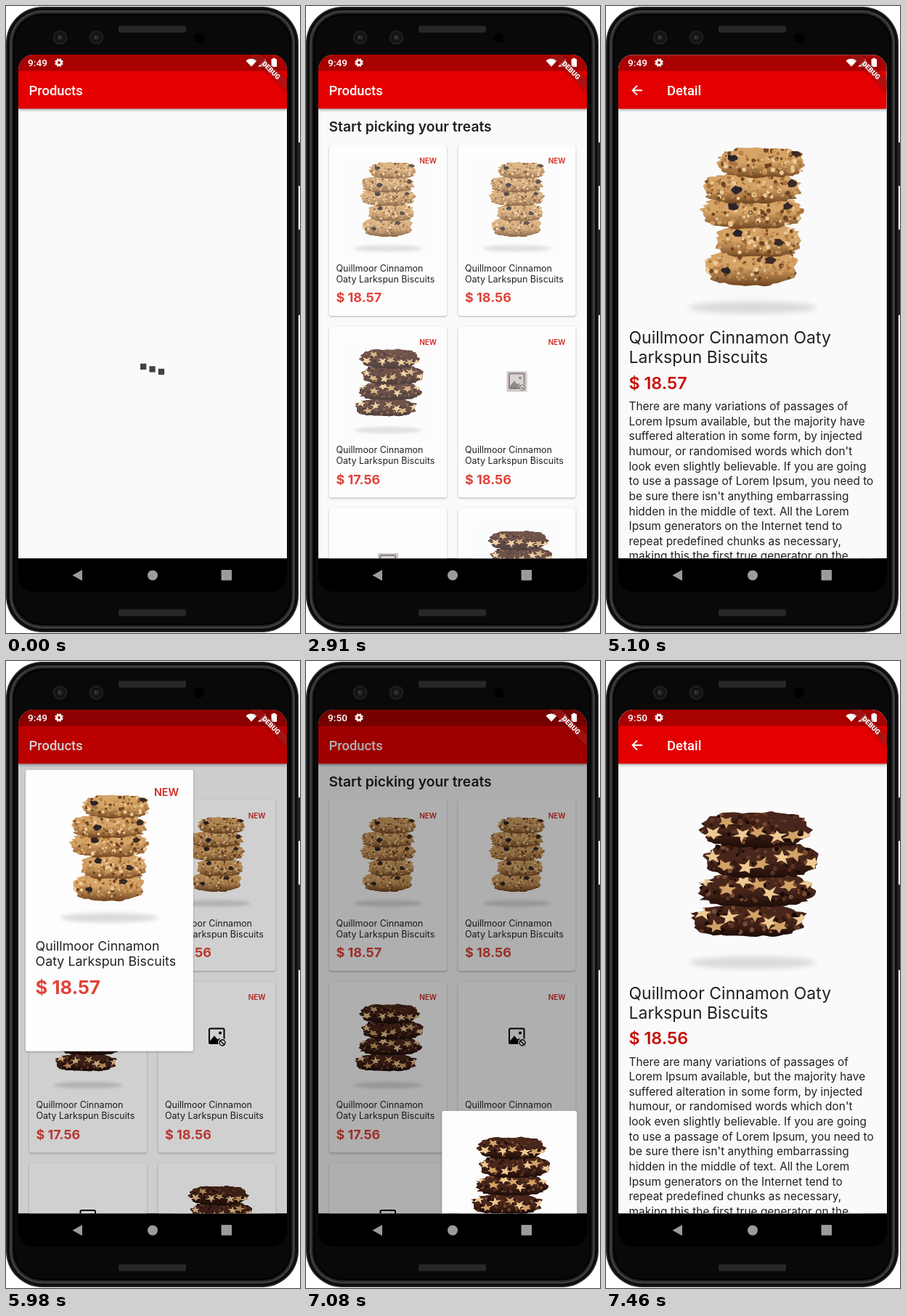
Animation of 405x864 px, one loop 8000 ms. Source, as an HTML page with a canvas:

```html
<!DOCTYPE html>
<html lang="en">
<head>
<meta charset="utf-8">
<title>Products</title>
<style>
  html, body { margin: 0; width: 100%; height: 100%; overflow: hidden; background: #fff; }
  canvas { display: block; }
</style>
</head>
<body>
<canvas id="stage" width="405" height="864"></canvas>
<script>
const LOOP = 8000;
const RED = '#e40000', PAPER = '#fafafa', CARD = '#fdfdfd', INK = '#242021';
const SCREEN = { x: 17, y: 67, w: 370, h: 694.5 };
const NAME = ['Quillmoor Cinnamon', 'Oaty Larkspun Biscuits'];
const LONG_NAME = ['Quillmoor Cinnamon Oaty', 'Larkspun Biscuits'];
const BODY = [
  'There are many variations of passages of',
  'Lorem Ipsum available, but the majority have',
  'suffered alteration in some form, by injected',
  "humour, or randomised words which don't",
  'look even slightly believable. If you are going',
  'to use a passage of Lorem Ipsum, you need to',
  "be sure there isn't anything embarrassing",
  'hidden in the middle of text. All the Lorem',
  'Ipsum generators on the Internet tend to',
  'repeat predefined chunks as necessary,',
  'making this the first true generator on the'
];

let ctx = document.getElementById('stage').getContext('2d');

const clamp = v => Math.max(0, Math.min(1, v));
const mix = (a, b, k) => a + (b - a) * k;
const inter = (size, weight = 400) => `${weight} ${size}px Inter, sans-serif`;
const roboto = (size, weight = 500) => `${weight} ${size}px Roboto, sans-serif`;

// Cubic bezier (0.4, 0, 0.2, 1)
function fastOutSlowIn(u) {
  let lo = 0, hi = 1;
  for (let i = 0; i < 24; i++) {
    const s = (lo + hi) / 2, r = 1 - s;
    if (1.2 * r * r * s + 0.6 * r * s * s + s ** 3 < u) lo = s; else hi = s;
  }
  return lo * lo * (3 - 2 * lo);
}

function randomizer(seed) {
  return () => (seed = (seed * 16807) % 2147483647) / 2147483647;
}

function text(str, x, y, font, color, align = 'left') {
  ctx.font = font;
  ctx.fillStyle = color;
  ctx.textAlign = align;
  ctx.fillText(str, x, y);
}

function rect(x, y, w, h, color) {
  ctx.fillStyle = color;
  ctx.fillRect(x, y, w, h);
}

function rounded(x, y, w, h, r, color) {
  ctx.beginPath();
  ctx.roundRect(x, y, w, h, r);
  if (color) { ctx.fillStyle = color; ctx.fill(); }
}

function circle(x, y, r, color) {
  ctx.beginPath();
  ctx.arc(x, y, r, 0, 7);
  ctx.fillStyle = color;
  ctx.fill();
}

function polygon(points, color) {
  ctx.beginPath();
  points.forEach(([x, y]) => ctx.lineTo(x, y));
  ctx.closePath();
  ctx.fillStyle = color;
  ctx.fill();
}

function line(points, width, color) {
  ctx.beginPath();
  points.forEach(([x, y]) => ctx.lineTo(x, y));
  ctx.lineWidth = width;
  ctx.strokeStyle = color;
  ctx.stroke();
}

// Runs draw with its own canvas state
function scoped(draw) {
  ctx.save();
  draw();
  ctx.restore();
}

function shadow(color, blur, dy) {
  ctx.shadowColor = color;
  ctx.shadowBlur = blur;
  ctx.shadowOffsetY = dy;
}

// ---- Cookie stacks, painted once around the picture centre ----
const OAT = {
  seed: 71, top: '#d6a467', bottom: '#6e431f',
  specks: ['#ecca97', '#a8733d', '#6f4523', '#cf9b5c', '#b9834a'], speckCount: 150, speckSize: 1.5,
  chunks: ['#2a2329', '#3a2a26'], chunkCount: 2, chunkSize: 3.4, spikes: 0.3,
  layers: [[-27, -52, 40, -29], [-38, -33, 37, -10], [-39, -16, 38, 9], [-28, 5, 37, 30], [-36, 23, 34, 51]]
};
const DARK = {
  seed: 23, top: '#48261b', bottom: '#1c0c08',
  specks: ['#5e3423', '#170907', '#33180f', '#7a4a30'], speckCount: 110, speckSize: 1.5,
  chunks: ['#efc993', '#d3a266'], chunkCount: 7, chunkSize: 5.6, spikes: 0.8,
  layers: [[-39, -45, 44, -18], [-37, -23, 49, 5], [-42, 1, 46, 26], [-47, 24, 41, 48]]
};
const PIC = { x: -60, y: -58, w: 120, h: 142, density: 3 };

function paintStack(kind) {
  const canvas = document.createElement('canvas');
  canvas.width = PIC.w * PIC.density;
  canvas.height = PIC.h * PIC.density;
  const outer = ctx, rand = randomizer(kind.seed);
  ctx = canvas.getContext('2d');
  ctx.scale(PIC.density, PIC.density);
  ctx.translate(-PIC.x, -PIC.y);
  scoped(() => {
    ctx.filter = 'blur(6px)';
    ctx.beginPath();
    ctx.ellipse(0, 67, 47, 4.5, 0, 0, 7);
    ctx.fillStyle = '#dcdad8';
    ctx.fill();
  });
  for (const [x0, y0, x1, y1] of [...kind.layers].reverse()) {
    const cx = (x0 + x1) / 2, cy = (y0 + y1) / 2, rx = (x1 - x0) / 2, ry = (y1 - y0) / 2;
    const squash = v => Math.sign(v) * Math.abs(v) ** 0.75;
    const outline = Array.from({ length: 54 }, (_, i) => {
      const a = i / 54 * 2 * Math.PI, k = 0.9 + rand() * 0.13;
      return [cx + rx * k * squash(Math.cos(a)), cy + ry * k * squash(Math.sin(a))];
    });
    const tone = ctx.createLinearGradient(0, y0, 0, y1);
    tone.addColorStop(0, kind.top);
    tone.addColorStop(0.5, kind.top);
    tone.addColorStop(1, kind.bottom);
    scoped(() => {
      polygon(outline, tone);
      ctx.clip();
      for (let i = 0; i < kind.speckCount; i++) {
        circle(mix(x0, x1, rand()), mix(y0, y1, rand() * 0.85), kind.speckSize * (0.3 + rand()),
          kind.specks[i % kind.specks.length]);
      }
      for (let i = 0; i < kind.chunkCount; i++) {
        const x = mix(x0, x1, (i + 0.25 + rand() * 0.6) / kind.chunkCount);
        const y = mix(y0, y1, 0.2 + rand() * 0.5);
        const spin = rand() * 6;
        polygon(Array.from({ length: 10 }, (_, j) => {
          const a = spin + j / 10 * 2 * Math.PI;
          const r = kind.chunkSize * (1 - (j % 2) * kind.spikes * 0.7) * (0.75 + rand() * 0.5);
          return [x + Math.cos(a) * r * 1.25, y + Math.sin(a) * r * 0.9];
        }), kind.chunks[i % 2]);
      }
    });
  }
  ctx = outer;
  return canvas;
}

const oatStack = paintStack(OAT), darkStack = paintStack(DARK);

function drawPicture(picture) {
  ctx.drawImage(picture, PIC.x, PIC.y, PIC.w, PIC.h);
}

// ---- Product cards ----
const CARD_W = 162, CARD_H = 236;
const cards = [
  ['$ 18.57', oatStack], ['$ 18.56', oatStack],
  ['$ 17.56', darkStack], ['$ 18.56', null],
  ['$ 18.56', null], ['$ 18.56', darkStack]
].map(([price, picture], i) => ({
  price, picture, isNew: i < 4,
  x: i % 2 ? 209.5 : 32,
  y: 191 + Math.floor(i / 2) * 250.5
}));

function drawPlaceholder(t) {
  const top = Math.max(-11, 7 - (t - 1990) / 45);
  rect(-11, top, 22, 11 - top, '#8f7a77');
  ctx.strokeStyle = '#6f514c';
  ctx.lineWidth = 3;
  ctx.strokeRect(-12.5, -12.5, 25, 25);
}

function drawMissingPicture() {
  rounded(-10.5, -11, 20.5, 20.5, 1.5);
  ctx.lineWidth = 2;
  ctx.strokeStyle = '#000';
  ctx.stroke();
  polygon([[-9.5, 9], [-9.5, 6], [-3.5, -1], [1, 4], [4, 2], [4, 9]], '#000');
  circle(4.5, -5, 2, '#000');
  circle(7.5, 8.5, 6, CARD);
  ctx.beginPath();
  ctx.arc(7.5, 8.5, 4, 0, 7);
  ctx.lineWidth = 1.4;
  ctx.stroke();
  line([[4.7, 5.7], [10.3, 11.3]], 1.4, '#000');
}

function drawCardContent(card, t) {
  scoped(() => {
    ctx.translate(card.x + 81, card.y + 76);
    const alpha = card.picture ? clamp((t - 2350) / 710) : clamp((t - 2600) / 870);
    const left = card.picture ? 1 - alpha : (1 - clamp((t - 2480) / 990)) ** 2;
    if (left > 0) scoped(() => { ctx.globalAlpha *= left; drawPlaceholder(t); });
    if (alpha > 0) scoped(() => {
      ctx.globalAlpha *= alpha;
      if (card.picture) {
        rect(PIC.x, PIC.y, PIC.w, PIC.h, CARD);
        drawPicture(card.picture);
      } else {
        drawMissingPicture();
      }
    });
  });
  if (card.isNew) text('NEW', card.x + 148, card.y + 25.5, inter(10, 600), '#d02a26', 'right');
  NAME.forEach((row, i) => text(row, card.x + 9.5, card.y + 174.5 + i * 15.3, inter(12.5), INK));
  text(card.price, card.x + 9.5, card.y + 217, inter(18, 700), '#e0433a');
}

// ---- Pages ----
function drawAppBar() {
  scoped(() => {
    shadow('rgba(0,0,0,.4)', 4, 1);
    rect(SCREEN.x, SCREEN.y, SCREEN.w, 74.5, RED);
  });
}

function drawLoader(t) {
  const clock = t < 1480 ? Math.min(Math.max(t, 100), 1250) : Math.min(t, 1580) - 230;
  for (let i = 0; i < 3; i++) {
    const y = 500.5 + 5.5 * Math.sin((i - 1) * 0.7 - (clock - 100) / 1000 * 2 * Math.PI);
    rect(185 + i * 12.4, y - 4.2, 8.3, 8.3, '#424242');
  }
}

function drawProducts(t) {
  rect(SCREEN.x, SCREEN.y, SCREEN.w, SCREEN.h, PAPER);
  if (t < 1990) {
    drawLoader(t);
  } else {
    text('Start picking your treats', 31.5, 173, inter(19.3, 600), INK);
    for (const card of cards) {
      scoped(() => {
        shadow('rgba(0,0,0,.3)', 2.5, 1);
        rounded(card.x, card.y, CARD_W, CARD_H, 3.5, CARD);
      });
      drawCardContent(card, t);
    }
  }
  drawAppBar();
  text('Products', 31.5, 123, roboto(18.4), '#fff');
}

function drawDetail(card) {
  rect(SCREEN.x, SCREEN.y, SCREEN.w, SCREEN.h, PAPER);
  scoped(() => {
    ctx.translate(202, 291);
    ctx.scale(1.86, 1.86);
    drawPicture(card.picture);
  });
  LONG_NAME.forEach((row, i) => text(row, 31.5, 465.5 + i * 27.2, inter(23), INK));
  text(card.price, 31.5, 528, inter(23.3, 600), '#c60b00');
  BODY.forEach((row, i) => text(row, 31.5, 557.5 + i * 20.65, inter(15.45), INK));
  drawAppBar();
  line([[50, 116], [37, 116]], 1.9, '#fff');
  line([[43, 109.5], [36.5, 116], [43, 122.5]], 1.9, '#fff');
  text('Detail', 84, 123, roboto(18.4), '#fff');
}

// ---- Card to page transitions ----
const flights = [
  { card: cards[0], begin: 4820, first: 4870, span: 300, hold: 0 },
  { card: cards[0], begin: 5848, first: 5880, span: 310, hold: 0, closing: true },
  { card: cards[5], begin: 7015, first: 7080, span: 345, hold: 70 }
];

function drawFlight(flight, t) {
  const { card, closing } = flight;
  const now = t < flight.first + flight.hold ? flight.first : t;
  const p = clamp((now - flight.begin) / flight.span);
  if (closing && p === 1) return;
  const eased = fastOutSlowIn(p);
  const size = closing ? 1 - eased : eased;
  const fade = clamp((p - 0.2) * 5);
  const pageAlpha = closing ? 1 - fade : fade;
  const dim = 0.54 * (closing ? size : Math.min(1, size * 5));
  rect(SCREEN.x, SCREEN.y, SCREEN.w, SCREEN.h, `rgba(0,0,0,${dim})`);

  const x = mix(card.x, SCREEN.x, size), y = mix(card.y, SCREEN.y, size);
  const w = mix(CARD_W, SCREEN.w, size), h = mix(CARD_H, SCREEN.h, size);
  scoped(() => {
    shadow('rgba(0,0,0,.3)', 3, 1);
    rounded(x, y, w, h, 3.5 * (1 - size), CARD);
  });
  ctx.clip();
  if (pageAlpha < 1) scoped(() => {
    ctx.translate(x, y);
    ctx.scale(w / CARD_W, w / CARD_W);
    ctx.translate(-card.x, -card.y);
    drawCardContent(card, t);
  });
  if (pageAlpha > 0) scoped(() => {
    ctx.globalAlpha = pageAlpha;
    ctx.translate(x, y);
    ctx.scale(w / SCREEN.w, w / SCREEN.w);
    ctx.translate(-SCREEN.x, -SCREEN.y);
    drawDetail(card);
  });
}

// ---- Device ----
function drawSpeaker(y) {
  rounded(155, y, 93, 10, 2, '#1c1c1c');
  for (let x = 156; x < 247; x += 2) rect(x, y + 1, 1, 8, '#333');
}

function drawPhone() {
  rect(0, 0, 405, 864, '#fff');
  rounded(400, 188, 5, 60, 1, '#1b1b1b');
  rounded(400, 308, 5, 118, 1, '#1b1b1b');
  [[0, '#2c2c2c'], [1.5, '#0c0c0c'], [5, '#3c3c3c'], [8, '#1c1c1c'], [10, '#000'], [12, '#090909']]
    .forEach(([d, color]) => rounded(d, 1 + d, 403 - 2 * d, 862 - 2 * d, 50 - d, color));
  drawSpeaker(27);
  drawSpeaker(831);
  for (const x of [74.5, 124.5]) {
    circle(x, 43.5, 10, '#1d1d1d');
    circle(x, 43.5, 7, '#111');
    circle(x, 43.5, 4, '#252525');
    circle(x - 1, 43, 1.3, '#4a4a4a');
  }
  circle(266, 44, 7, '#000');
}

function drawStatusBar(t) {
  rect(SCREEN.x, SCREEN.y, SCREEN.w, 22.5, 'rgba(0,0,0,.26)');
  text(t < 6100 ? '9:49' : '9:50', 30, 83, roboto(13.7), '#fff');
  for (let i = 0; i < 4; i++) {
    const a = i * Math.PI / 4 + 0.4, dx = Math.cos(a) * 5.8, dy = Math.sin(a) * 5.8;
    line([[73 - dx, 78 - dy], [73 + dx, 78 + dy]], 2.4, '#fff');
  }
  circle(73, 78, 4.5, '#fff');
  circle(73, 78, 1.9, '#a80000');
  ctx.beginPath();
  ctx.moveTo(338, 83.5);
  ctx.arc(338, 83.5, 11, -Math.PI * 0.74, -Math.PI * 0.26);
  ctx.fillStyle = '#fff';
  ctx.fill();
  polygon([[347, 83.5], [358, 72.5], [358, 83.5]], '#fff');
  rounded(365.5, 73, 7.5, 11, 1, '#fff');
  rect(367.5, 71.8, 3.5, 2, '#fff');
}

function drawDebugBanner() {
  scoped(() => {
    ctx.translate(SCREEN.x + SCREEN.w, SCREEN.y);
    ctx.rotate(Math.PI / 4);
    scoped(() => {
      shadow('rgba(0,0,0,.5)', 5, 0);
      rect(-36, 25.2, 72, 10.8, 'rgba(183,28,28,.63)');
    });
    text('DEBUG', 0, 34, roboto(9.6, 900), '#fff', 'center');
  });
}

function drawNavigation() {
  rect(SCREEN.x, SCREEN.y + SCREEN.h, SCREEN.w, 46, '#000');
  polygon([[91.5, 784.5], [105, 777], [105, 792]], '#9b9b9b');
  circle(202, 784.5, 7, '#9b9b9b');
  rounded(296.5, 777, 14.5, 14.5, 1, '#9b9b9b');
}

function render(t) {
  drawPhone();
  scoped(() => {
    rounded(SCREEN.x, SCREEN.y, SCREEN.w, 740, 21);
    ctx.clip();
    scoped(() => {
      ctx.beginPath();
      ctx.rect(SCREEN.x, SCREEN.y, SCREEN.w, SCREEN.h);
      ctx.clip();
      drawProducts(t);
      const flight = flights.filter(f => t >= f.first).pop();
      if (flight) drawFlight(flight, t);
    });
    drawStatusBar(t);
    drawDebugBanner();
    drawNavigation();
  });
}

const started = performance.now();
function tick() {
  render((performance.now() - started) % LOOP);
  requestAnimationFrame(tick);
}
tick();
</script>
</body>
</html>
```
